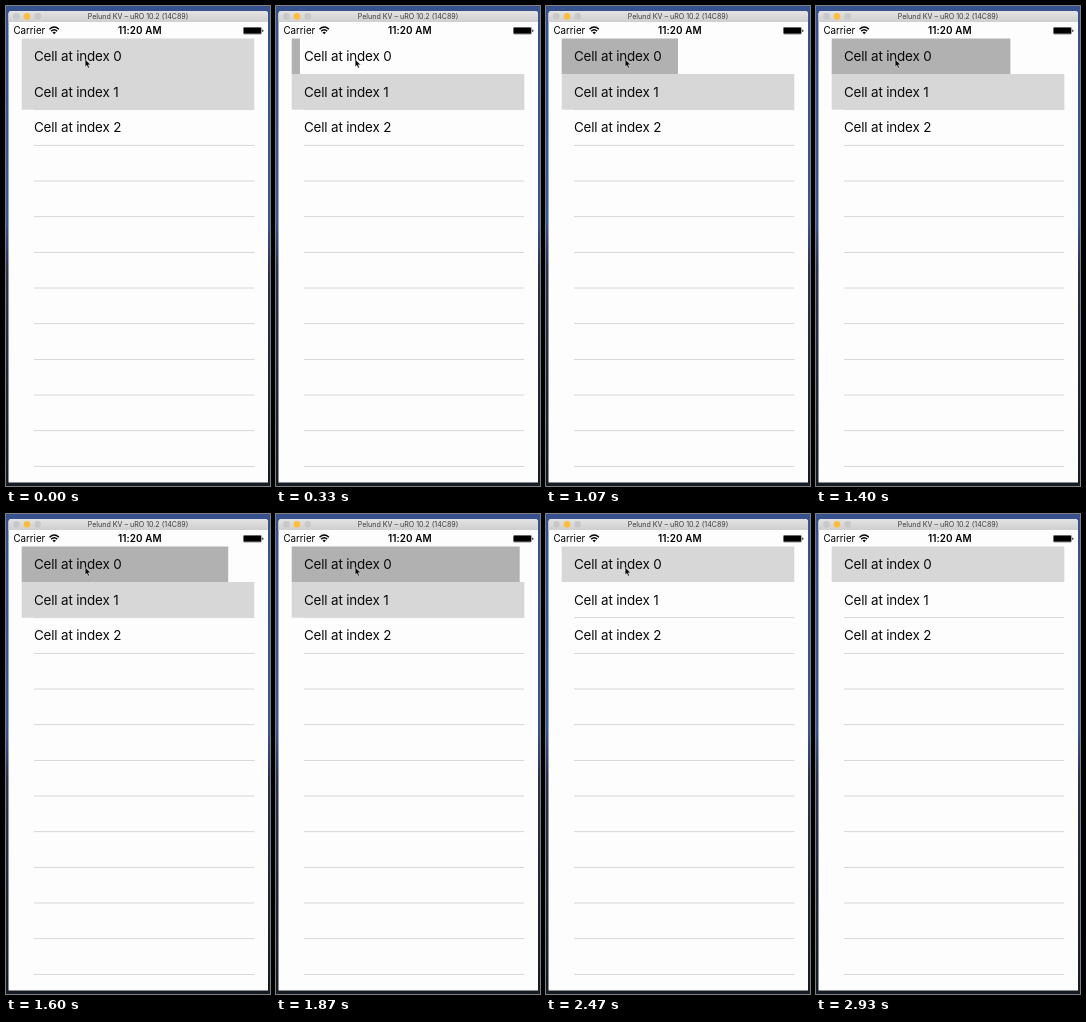
Write an HTML page that moves like this. It is 264 by 480 pixels and loops after 3.07 s.

```html
<!DOCTYPE html>
<html lang="en">
<head>
<meta charset="utf-8">
<title>Cell press progress</title>
<style>
  html, body { margin: 0; width: 100%; height: 100%; overflow: hidden; background: #1b2130; }
  svg { display: block; width: 264px; height: 480px; font-family: Inter, Roboto, sans-serif; }
  .cell { font-size: 13.4px; letter-spacing: -.16px; fill: #0a0a0a; }
  .sel { fill: #d7d7d7; }
  .line { fill: #cecece; }
</style>
</head>
<body>
<svg viewBox="0 0 264 480">
  <defs>
    <linearGradient id="desk" x2="0" y2="1">
      <stop offset="0" stop-color="#37518e"/>
      <stop offset=".45" stop-color="#3a558f"/>
      <stop offset=".55" stop-color="#2a3350"/>
      <stop offset="1" stop-color="#151b22"/>
    </linearGradient>
    <linearGradient id="bar" x2="0" y2="1">
      <stop offset="0" stop-color="#e4e3e4"/>
      <stop offset="1" stop-color="#d0cfd0"/>
    </linearGradient>
  </defs>

  <rect width="264" height="480" fill="url(#desk)"/>
  <path d="M2.5 476.6V8q0-3 3-3H259q3 0 3 3V476.6z" fill="#fdfdfd"/>
  <path d="M2.5 16V8q0-3 3-3H259q3 0 3 3V16z" fill="url(#bar)"/>
  <circle cx="10.4" cy="10.4" r="3.3" fill="#c9c8c9"/>
  <circle cx="21" cy="10.4" r="3.3" fill="#fdbd40"/>
  <circle cx="31.7" cy="10.4" r="3.3" fill="#c9c8c9"/>
  <text x="132" y="13.2" font-size="7.1" fill="#3c3c3c" text-anchor="middle">Pelund KV – uRO 10.2 (14C89)</text>

  <text x="7.4" y="28" font-size="9.75">Carrier</text>
  <g fill="none" stroke="#000" stroke-width="1.4">
    <path d="M43.5 23.2q4.7-4.2 9.4 0M45.2 25.1q3-2.6 6 0"/>
    <path d="M48.2 28.3l-1.7-1.8q1.7-1.4 3.4 0z" fill="#000" stroke="none"/>
  </g>
  <text x="133.8" y="28" font-size="9.9" font-weight="600" letter-spacing=".1" text-anchor="middle">11:20 AM</text>
  <rect x="237" y="21" width="18.8" height="7.4" rx="1.4" fill="#8a8a8a"/>
  <rect x="237.8" y="21.8" width="17.2" height="5.8" rx=".6"/>
  <path d="M256.3 23.4q1.2 .3 1.2 1.3t-1.2 1.3z"/>

  <g id="lines"></g>
  <rect class="sel" id="row0" x="15.7" y="32.5" width="232.6" height="35.5"/>
  <rect class="sel" id="row1" x="15.7" y="68" width="232.6" height="35.7"/>
  <rect id="progress" x="15.7" y="32.5" height="35.5" fill="#b1b1b1"/>
  <g id="labels"></g>
  <path id="cursor" d="M79.2 53.5v7.3l1.7-1.5 1.2 2.8 1.3-.6-1.2-2.7h2.3z" stroke="#fff" stroke-width=".4"/>
</svg>
<script>
  const LOOP = 3070, STEP = 200 / 3, PRESS = 2000, ROW = 107 / 3;
  const $ = id => document.getElementById(id);
  const show = (id, on) => $(id).setAttribute('visibility', on ? 'visible' : 'hidden');

  let lines = '', labels = '';
  for (let i = 2; i <= 12; i++)
    lines += `<rect class="line" x="28" y="${31.95 + ROW * i}" width="220.3" height=".8"/>`;
  for (let i = 0; i < 3; i++)
    labels += `<text class="cell" x="28" y="${55 + ROW * i}">Cell at index ${i}</text>`;
  $('lines').innerHTML = lines;
  $('labels').innerHTML = labels;

  // cubic-bezier(.42, 0, .58, 1)
  function easeInOut(x) {
    let lo = 0, hi = 1;
    for (let i = 0; i < 24; i++) {
      const s = (lo + hi) / 2, r = 1 - s;
      if (1.26 * r * r * s + 1.74 * r * s * s + s * s * s < x) lo = s; else hi = s;
    }
    return lo * lo * (3 - 2 * lo);
  }

  function draw(t) {
    // the screen refreshes 15 times a second
    const n = Math.floor((t + 4) / STEP);
    const pressing = n >= 1 && n < 33, selected = n >= 37;
    const u = Math.min(1, Math.max(0, (n - 1) * STEP / PRESS));
    $('progress').setAttribute('width', pressing ? 232.6 * easeInOut(u) : 0);
    show('row0', n < 1 || selected);
    show('row1', !selected);
    show('cursor', n < 43);
  }

  let start;
  function tick(now) {
    start ??= now;
    draw((now - start) % LOOP);
    requestAnimationFrame(tick);
  }
  draw(0);
  requestAnimationFrame(tick);
</script>
</body>
</html>
```
